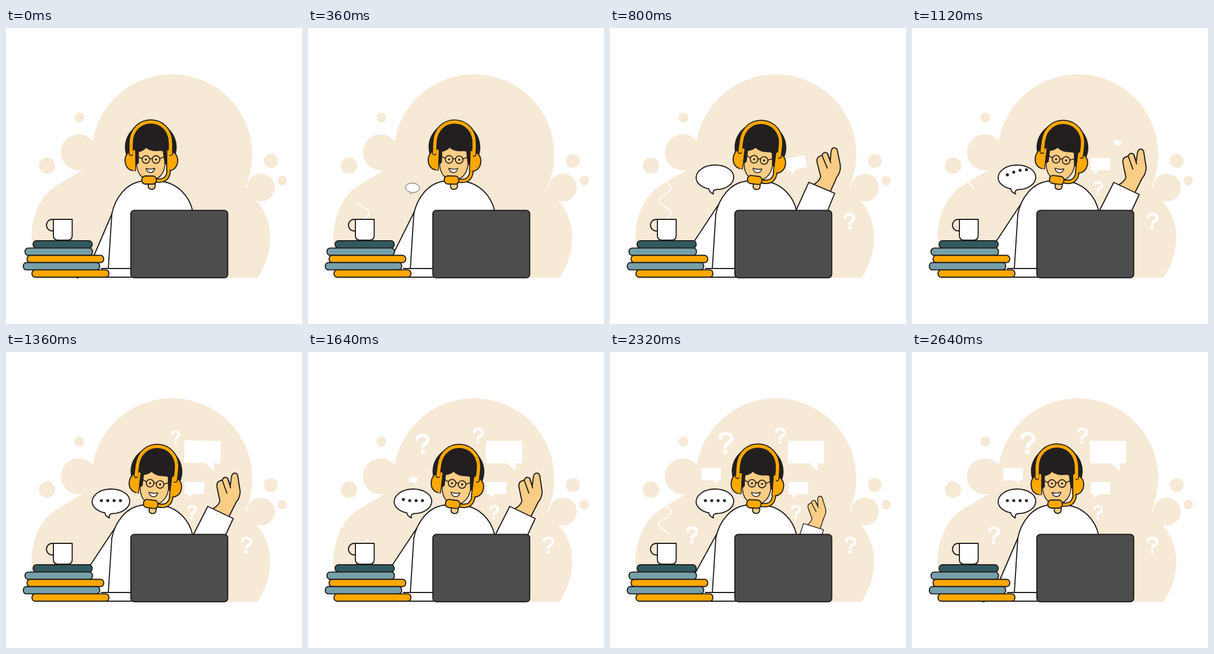
Write an HTML page with a canvas that moves like this. It is 512 by 512 pixels and loops after 2.88 s.

```html
<!DOCTYPE html>
<html>
<head>
<meta charset="utf-8">
<style>
html, body { margin: 0; width: 100%; height: 100%; overflow: hidden; background: #fff; }
canvas { display: block; width: 512px; height: 512px; }
</style>
</head>
<body>
<canvas id="stage" width="512" height="512"></canvas>
<script>
const canvas = document.getElementById('stage');
const ctx = canvas.getContext('2d');
const ratio = window.devicePixelRatio || 1;
canvas.width = canvas.height = 512 * ratio;

const LOOP = 2880, STEP = 40;
const INK = '#231f20', CREAM = '#f6e9d5', ORANGE = '#ffa800', SKIN = '#f9cd85';
const TEAL = '#76a0a9', DARK_TEAL = '#315a60', GREY = '#4d4d4d', WHITE = '#fff';

const clamp = v => Math.max(0, Math.min(1, v));
const span = (t, a, b) => clamp((t - a) / (b - a));
const smooth = (t, a, b) => { const p = span(t, a, b); return p * p * (3 - 2 * p); };
const mix = (a, b, p) => a + (b - a) * p;

function shape(d, fill, stroke, width = 1.9) {
  const path = typeof d === 'string' ? new Path2D(d) : d;
  if (fill) { ctx.fillStyle = fill; ctx.fill(path); }
  if (stroke) { ctx.strokeStyle = stroke; ctx.lineWidth = width; ctx.stroke(path); }
}

function disc(x, y, r, fill, stroke, width) {
  const p = new Path2D();
  p.arc(x, y, r, 0, 7);
  shape(p, fill, stroke, width);
}

function box(x, y, w, h, r, fill, stroke = INK, width) {
  const p = new Path2D();
  p.roundRect(x, y, w, h, r);
  shape(p, fill, stroke, width);
}

function at(x, y, degrees, scale, draw) {
  if (scale <= 0) return;
  ctx.save();
  ctx.translate(x, y);
  ctx.rotate(degrees * Math.PI / 180);
  ctx.scale(scale, scale);
  draw();
  ctx.restore();
}

// Grow from a base point, lean over, swing back and settle.
function pop(t, start, x, y, lean, size, draw) {
  const u = t - start;
  const swing = u < 240 ? 12 * smooth(u, 0, 240)
    : u < 360 ? mix(12, -5, smooth(u, 240, 360))
    : mix(-5, 0, smooth(u, 360, 460));
  at(x, y, swing * lean, size * smooth(u, 0, 240), draw);
}

function backdrop() {
  disc(287, 219, 139, CREAM);
  shape('M52 432 Q44 396 44 365 C44 325 60 289 88 272 L130 247 L200 180 H400 L412 270 L432 298 C447 313 457 337 457 362 Q457 398 435 432Z', CREAM);
  for (const [x, y, r] of [[126, 215, 31], [127, 155, 8.5], [71, 238, 14], [441, 276, 24], [458, 230, 12], [478, 264, 8]])
    disc(x, y, r, CREAM);
}

function question(t, start, x, y, size) {
  pop(t, start, x, y, -0.4, size, () => {
    ctx.rotate(0.05);
    shape('M-7.7 -21.5 C-7.5 -29.5 7.8 -29.5 7.8 -20.5 C7.8 -14.5 0 -15.5 0 -9.8', null, WHITE, 4.8);
    disc(0, -3, 3, WHITE);
  });
}

function note(t, start, x, y, side, size) {
  pop(t, start, x, y, side, size, () => {
    ctx.scale(side, 1);
    shape('M-28 -28 H6 V-7 H0 V0 L-8.3 -7 H-28Z', WHITE);
  });
}

function speech(t) {
  pop(t, 260, 179, 287, 1, 1, () => {
    ctx.translate(-179, -287);
    shape('M171 278.3 C158 275.5 149 268 149 259 C149 247 163.5 237 181.5 237 C199.5 237 214 246 214 258 C214 270 200 279.5 183.5 279.5 C179 280 177 284 179 287 Q172 284.5 171 278.3Z', WHITE, INK);
    for (let i = 0; i < 4; i++) {
      const begin = 826 + i * 45;
      const hop = s => Math.sin(Math.PI * span(t, s, s + 320));
      const y = 257 - 12 * (hop(begin) + hop(begin + 798));
      disc(165 + i * 11, y, 2.6 * span(t, begin - 20, begin + 40), INK);
    }
  });
}

function steam(t, start) {
  const head = span(t, start, start + 400);
  const tail = span(t, start + 640, start + 1000);
  if (head <= tail) return;
  const p = new Path2D();
  for (let i = 0; i <= 50; i++) {
    const y = 330 - 63 * mix(tail, head, i / 50);
    p.lineTo(95 + 10.7 * Math.cos((y - 320) * Math.PI / 21.5), y);
  }
  shape(p, null, WHITE, 1.9);
}

function desk() {
  shape('M82 331 H80 A10 10 0 0 0 80 351 H82', null, INK);
  shape('M82 331 H114.5 V359 Q114.5 367 106.5 367 H90 Q82 367 82 359Z', WHITE, INK);
  const books = [[47, 149, DARK_TEAL], [33, 149.5, TEAL], [36.5, 169, ORANGE], [30, 162, TEAL], [45, 178, ORANGE]];
  books.forEach(([l, r, color], i) => box(l, 368 + i * 12.6, r - l, 12.6, 5.5, color));
}

function body(k) {
  const x = mix(186, 190, k), y = mix(315, 302, k);
  const ex = mix(152, 135, k), ey = mix(394, 385, k);
  shape(`M${x} ${y} L${ex} ${ey} L140 431 H216 V320 H186Z`, WHITE);
  shape(`M${x} ${y} L${ex} ${ey}`, null, INK);
  if (k < 0.02) shape('M122.5 431.8 H125', null, INK, 2.2);
  shape('M177 416 L183 322 C188 296 207 266 240 264.5 H264 C296 267 317 290 323 317 V416Z', WHITE);
  shape('M177 416 L183 322 C188 296 207 266 240 264.5 H264 C296 267 317 290 323 317', null, INK);
  shape('M165 416 H217 M160 431 H217', null, INK);
}

function head(k) {
  at(250, 286, 7 * k, 1, () => {
    ctx.translate(-250, -286);
    shape('M246 262 V273 Q246 279 252 279 Q258 279 258 273 V262Z', SKIN, INK);

    ctx.save();
    ctx.beginPath();
    ctx.rect(200, 150, 100, 86);
    ctx.clip();
    const hair = new Path2D();
    hair.ellipse(250.5, 206, 44.8, 44, 0, 0, 7);
    shape(hair, INK);
    ctx.restore();

    shape('M229 214 Q238 212 242 206.5 Q250 213 262 212 Q270 211 272 213 L275 235 C274 252 264 263 250 263 C236 263 227 252 226 236 L229 233Z', SKIN, INK, 1.5);
    for (const x of [242, 259.5]) {
      disc(x, 227.5, 6.6, null, INK, 1.7);
      disc(x, 227.5, 1.8, INK);
    }
    shape('M248.5 226.5 Q250.7 225 253 226.5 M235.5 226 L228 222.5 M266 226 L274 222.5', null, INK, 1.6);
    shape('M242 243 Q250 245.5 257.5 242.5 Q256 250 250 250 Q244 250 242 243Z', WHITE, INK, 1.4);

    const boom = 'M281.5 240 V246 Q281 263 266 264 H258';
    shape(boom, null, INK, 7.6);
    shape(boom, null, ORANGE, 4);
    shape('M224 212 V246.5 C212 248 206 239 206 229 C206 220 211 214 217 213Z', ORANGE, INK);
    shape('M278 212 V246.5 C291 248 297 239 297 229 C297 220 291 214 285 213Z', ORANGE, INK);
    const band = 'M216.5 217 V200 C216.5 150 284.5 150 284.5 200 V217';
    shape(band, null, INK, 8.8);
    shape(band, null, ORANGE, 5.6);
    shape('M221.5 213 V245 M281 213 V246', null, ORANGE, 4);
    box(235, 256, 25, 14, 6, ORANGE);
  });
}

function hand(t) {
  const raise = smooth(t, 180, 690) * (1 - smooth(t, 2180, 2600));
  const turn = t < 1400
    ? mix(-9, -2.6, smooth(t, 200, 680)) + 2.6 * smooth(t, 800, 1080)
    : -32 * (1 - raise);
  at(341.5, 381, turn, raise, () => {
    ctx.translate(-341.5, -381);
    shape('M356 272 Q368 266 370 258 L365 234 Q363.5 225 370 223 L374 221.5 Q377 214 383.5 218.5 L388 231 L390 215 Q392 209 396 209.5 Q400.5 210 401 215 L405 241 Q405 252 398 260 L385 286Z', SKIN, INK);
    shape('M374 221.5 L382 244 M383.5 218.5 L388.5 235', null, INK);
    shape('M349 267 L393 288 L369 340 L313 338Z', WHITE, INK);
  });
}

function render(ms) {
  const t = Math.floor((ms % LOOP) / STEP) * STEP;
  ctx.setTransform(ratio, 0, 0, ratio, 0, 0);
  ctx.fillStyle = WHITE;
  ctx.fillRect(0, 0, 512, 512);
  ctx.lineCap = ctx.lineJoin = 'round';

  const lean = smooth(t, 180, 690) * (1 - smooth(t, 2000, 2640));
  backdrop();
  question(t, 580, 415, 349, 1);
  question(t, 780, 321, 289.5, 0.83);
  question(t, 1180, 293.5, 159, 0.95);
  question(t, 1440, 199, 176, 1.27);
  question(t, 1760, 141, 332, 1.03);
  note(t, 560, 315, 253, -1, 1);
  note(t, 1050, 359.5, 205.5, 1, 1.85);
  note(t, 1533, 186, 229, 1, 1);
  steam(t, 190);
  steam(t, 1600);
  body(lean);
  speech(t);
  desk();
  hand(t);
  head(lean);
  box(216, 315.5, 167.5, 116.5, 6, GREY, INK, 2);
}

const began = performance.now();
function tick() {
  render(performance.now() - began);
  requestAnimationFrame(tick);
}
tick();
</script>
</body>
</html>
```
